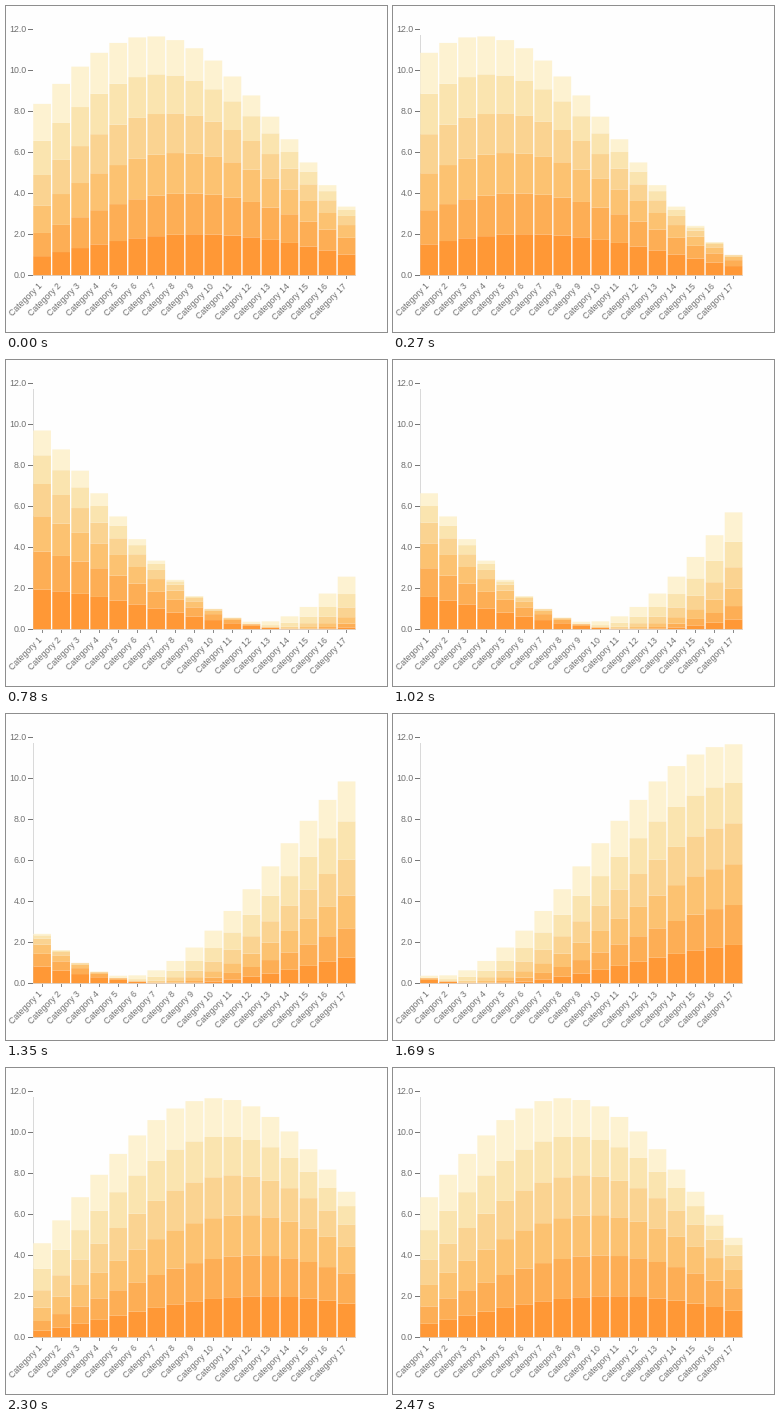
A matplotlib script for the animation above (2540 ms loop, 381 px wide and 326 px high).

```python
import numpy as np
import matplotlib.pyplot as plt
from matplotlib.animation import FuncAnimation
from matplotlib.collections import LineCollection, PolyCollection

W, H, DPI = 381, 326, 64
PT = 72 / DPI                     # points per pixel
LOOP, TICK = 2540, 10             # ms
BARS = 17
BASE, UNIT = 269.2, 20.5          # zero line and pixels per value unit
X0, STEP, BAR_W = 36.1, 19.03, 17.7
COLORS = ["#ff9836", "#fdae55", "#fcc271", "#fad391", "#fae4af", "#fdf2d1"]
LAYERS = len(COLORS)

# How long each step of the wave is held, in ms
HOLDS = ([70, 70] + [80] * 5 + [70, 100, 70, 70, 100, 70, 100, 70, 80, 80, 100]
         + [80] * 3 + [100] + [80] * 3 + [100, 100, 70, 70, 100, 70])
ENDS = np.cumsum(HOLDS)

plt.rcParams["font.family"] = "Liberation Sans"
fig = plt.figure(figsize=(W / DPI, H / DPI), dpi=DPI, facecolor="#fefefe")
ax = fig.add_axes([0, 0, 1, 1])
ax.set_xlim(0, W)
ax.set_ylim(H, 0)
ax.axis("off")

centers = X0 + STEP * np.arange(BARS)


def add_lines(segments, color):
    lines = LineCollection(segments, colors=color, linewidths=PT,
                           capstyle="butt", zorder=1, snap=False)
    return ax.add_collection(lines, autolim=False)


def label(x, y, text, **kw):
    ax.text(x, y, text, fontsize=8.8 * PT, color="#707070", ha="right", **kw)


def bar_polys(step):
    """Rectangles of every layer, bottom layer first."""
    k = np.arange(BARS)
    layer = np.arange(LAYERS)[:, None]
    values = 1 + np.sin(0.2 * (k + step + layer) - 0.07)
    tops = BASE - UNIT * np.cumsum(values, axis=0)
    bottoms = np.vstack([np.full(BARS, BASE), tops[:-1]])
    left = np.broadcast_to(centers - BAR_W / 2, tops.shape)
    right = left + BAR_W
    xs = np.stack([left, right, right, left], axis=-1)
    ys = np.stack([bottoms, bottoms, tops, tops], axis=-1)
    return np.stack([xs, ys], axis=-1).reshape(-1, 4, 2)


# Axes, ticks and labels
y_axis = add_lines([[(27.5, 29), (27.5, 269)]], "#d9d9d9")
add_lines([[(27, 269.5), (350, 269.5)]], "#d9d9d9")
tick_ys = [269.5 - UNIT * v for v in range(0, 13, 2)]
add_lines([[(22, y), (27, y)] for y in tick_ys], "#777777")
add_lines([[(x, 270), (x, 273)] for x in np.floor(centers) + 0.5], "#8a8a8a")
for value, y in zip(range(0, 13, 2), tick_ys):
    label(20, y + 2.5, f"{value:.1f}", va="baseline")
for i, x in enumerate(centers, 1):
    label(x + 2, 275.6, f"Category {i}", va="top", rotation=45)

bars = PolyCollection(bar_polys(0), facecolors=np.repeat(COLORS, BARS),
                      edgecolors="none", linewidths=0, zorder=2, snap=False)
ax.add_collection(bars, autolim=False)


def update(frame):
    step = np.searchsorted(ENDS, frame * TICK, side="right")
    bars.set_verts(bar_polys(step))
    y_axis.set_visible(step > 0)      # the axis line appears with the first move
    return [bars, y_axis]


anim = FuncAnimation(fig, update, frames=LOOP // TICK, interval=TICK,
                     repeat=True, repeat_delay=0)
plt.show()
```
